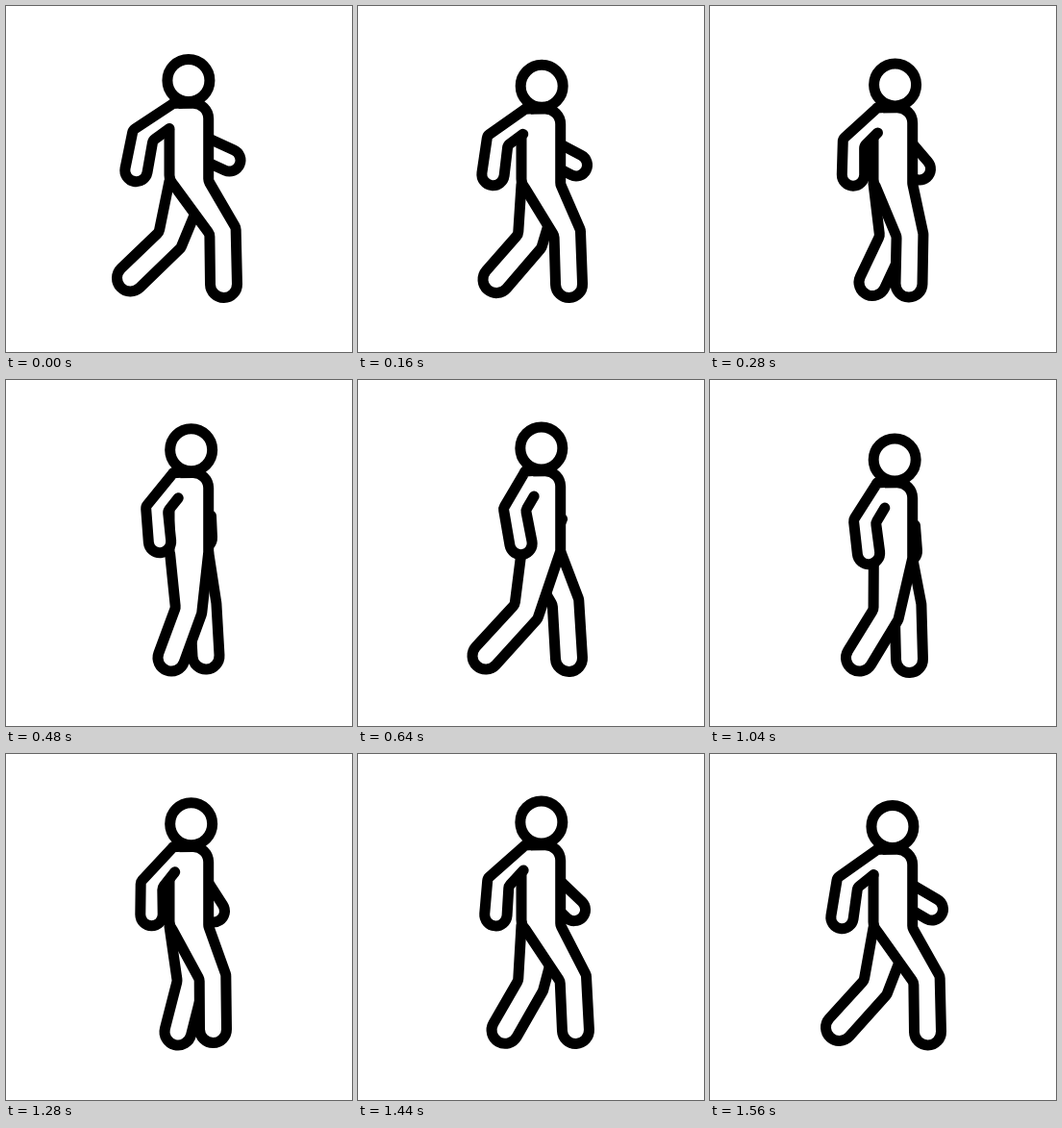
These frames come from a looping animation (360x360 px, 1600 ms). An HTML page with a canvas:

```html
<!DOCTYPE html>
<html lang="en">
<head>
<meta charset="utf-8">
<title>Walking figure</title>
<style>
  html, body { margin: 0; width: 100%; height: 100%; overflow: hidden; background: #fff; }
  canvas { display: block; width: 360px; height: 360px; }
</style>
</head>
<body>
<canvas id="stage" width="360" height="360"></canvas>
<script>
const LOOP = 1600, STEP = 40;
const ctx = document.getElementById('stage').getContext('2d');

// Joint positions at the key times, as x and y rows.
const times = [0, 280, 480, 640, 840, 1040, 1280, 1560];
const joints = {
  nearKnee:  [[225.5, 208, 190, 175, 174, 183, 215, 225.5], [234, 238.5, 240, 241, 240.5, 244, 232, 234.5]],
  nearFoot:  [[226.5, 207, 172, 133, 131, 155.5, 215.5, 226.5], [289.5, 289, 289, 287, 284.5, 289, 286.5, 289]],
  farKnee:   [[170.5, 190, 205, 216, 214, 206, 192, 172], [243.5, 243, 234, 231, 236, 235, 238, 243]],
  farFoot:   [[129.5, 169, 208, 219.5, 223, 207.5, 179, 134.5], [283, 287.5, 287, 289.5, 291.5, 290.5, 289, 284.5]],
  nearElbow: [[142.5, 149.5, 157, 163, 167.5, 161, 151.5, 143], [134.5, 142, 134, 134.5, 144, 147, 136, 134]],
  nearHand:  [[135.5, 149, 160, 169.5, 176, 165, 151.5, 137.5], [171, 175.5, 168, 170, 179, 180, 167, 170]],
  farHand:   [[232.5, 218, 203, 190, 188, 204, 216, 231], [160.5, 169.5, 164, 168, 178, 178, 163.5, 161.5]]
};

// Smooth periodic curve through a row of values.
function sample(row, t) {
  const n = times.length;
  const wrap = i => (i + n) % n;
  const span = i => (times[wrap(i + 1)] - times[wrap(i)] + LOOP) % LOOP;
  const rate = i => (row[wrap(i + 1)] - row[wrap(i)]) / span(i);
  const slope = i => (rate(i - 1) * span(i) + rate(i) * span(i - 1)) / (span(i) + span(i - 1));
  let i = n - 1;
  while (times[i] > t) i--;
  const h = span(i), u = (t - times[i]) / h, v = 1 - u;
  return v * v * (1 + 2 * u) * row[i] + u * u * (3 - 2 * u) * row[wrap(i + 1)]
    + h * u * v * (v * slope(i) - u * slope(i + 1));
}

const wave = (t, mean, amp, peak) => mean + amp * Math.cos(2 * Math.PI * (t - peak) / 800);
const mid = (a, b) => [(a[0] + b[0]) / 2, (a[1] + b[1]) / 2];

// Unit normal on the left side of a limb running from a to b.
function normal(a, b) {
  const dx = b[0] - a[0], dy = b[1] - a[1], len = Math.hypot(dx, dy);
  return [-dy / len, dx / len];
}

function shift(p, n, d) {
  return [p[0] + n[0] * d, p[1] + n[1] * d];
}

function bend(corner, next, r) {
  ctx.arcTo(...corner, ...next, r);
}

// Outline from the left root, around the limb's end, to the right root.
function limb(left, joint, end, right, r, round) {
  const n1 = normal(mid(left, right), joint), n2 = normal(joint, end);
  const sx = n1[0] * 0.6 + n2[0], sy = n1[1] * 0.6 + n2[1];
  const len = Math.hypot(sx, sy), side = [sx / len, sy / len];
  bend(shift(joint, side, r), shift(end, n2, r), round);
  const a = Math.atan2(n2[1], n2[0]);
  ctx.arc(...end, r, a, a - Math.PI, true);
  bend(shift(joint, side, -r), right, round);
}

function ink() {
  ctx.fill();
  ctx.stroke();
}

function draw(t) {
  const p = {};
  for (const name in joints) p[name] = joints[name].map(row => sample(row, t));
  const headX = wave(t, 191.5, 1.6, 385), headY = wave(t, 77, 6.5, 190);
  const top = headY + 23.5;
  const hipY = 182 + 0.6 * (headY - 77.5);
  const hipL = [170, hipY], hipR = [210.7, hipY];
  const neck = [174, top + 0.5];

  ctx.fillStyle = '#fff';
  ctx.fillRect(0, 0, 360, 360);
  ctx.strokeStyle = '#000';
  ctx.lineWidth = 11;
  ctx.lineCap = ctx.lineJoin = 'round';

  // Far arm
  const elbow = [202, headY + 69], n = normal(elbow, p.farHand);
  const a = Math.atan2(n[1], n[0]);
  ctx.beginPath();
  ctx.moveTo(...shift(elbow, n, 11.5));
  ctx.arc(...p.farHand, 11.5, a, a - Math.PI, true);
  ctx.lineTo(...shift(elbow, n, -11.5));
  ink();

  // Far leg
  ctx.beginPath();
  ctx.moveTo(...hipL);
  limb(hipL, p.farKnee, p.farFoot, hipR, 14, 8);
  ctx.lineTo(...hipR);
  ink();

  // Torso and near leg
  ctx.beginPath();
  ctx.moveTo(170, headY + 52);
  bend(hipL, p.nearKnee, 14);
  limb(hipL, p.nearKnee, p.nearFoot, hipR, 14, 8);
  bend(hipR, [hipR[0], top], 8);
  bend([hipR[0], top], neck, 16);
  ctx.lineTo(...neck);
  ink();

  // Near arm
  const pit = [170 + (p.nearElbow[0] - 142.5) * 0.64, headY + 50];
  ctx.beginPath();
  ctx.moveTo(182, top);
  ctx.lineTo(...neck);
  limb(neck, p.nearElbow, p.nearHand, pit, 11.7, 6);
  ctx.lineTo(...pit);
  ink();

  // Head
  ctx.beginPath();
  ctx.arc(headX, headY, 22, 0, 2 * Math.PI);
  ink();
}

const start = performance.now();
function tick() {
  const t = (performance.now() - start) % LOOP;
  draw(Math.floor(t / STEP) * STEP);
  requestAnimationFrame(tick);
}
tick();
</script>
</body>
</html>
```
